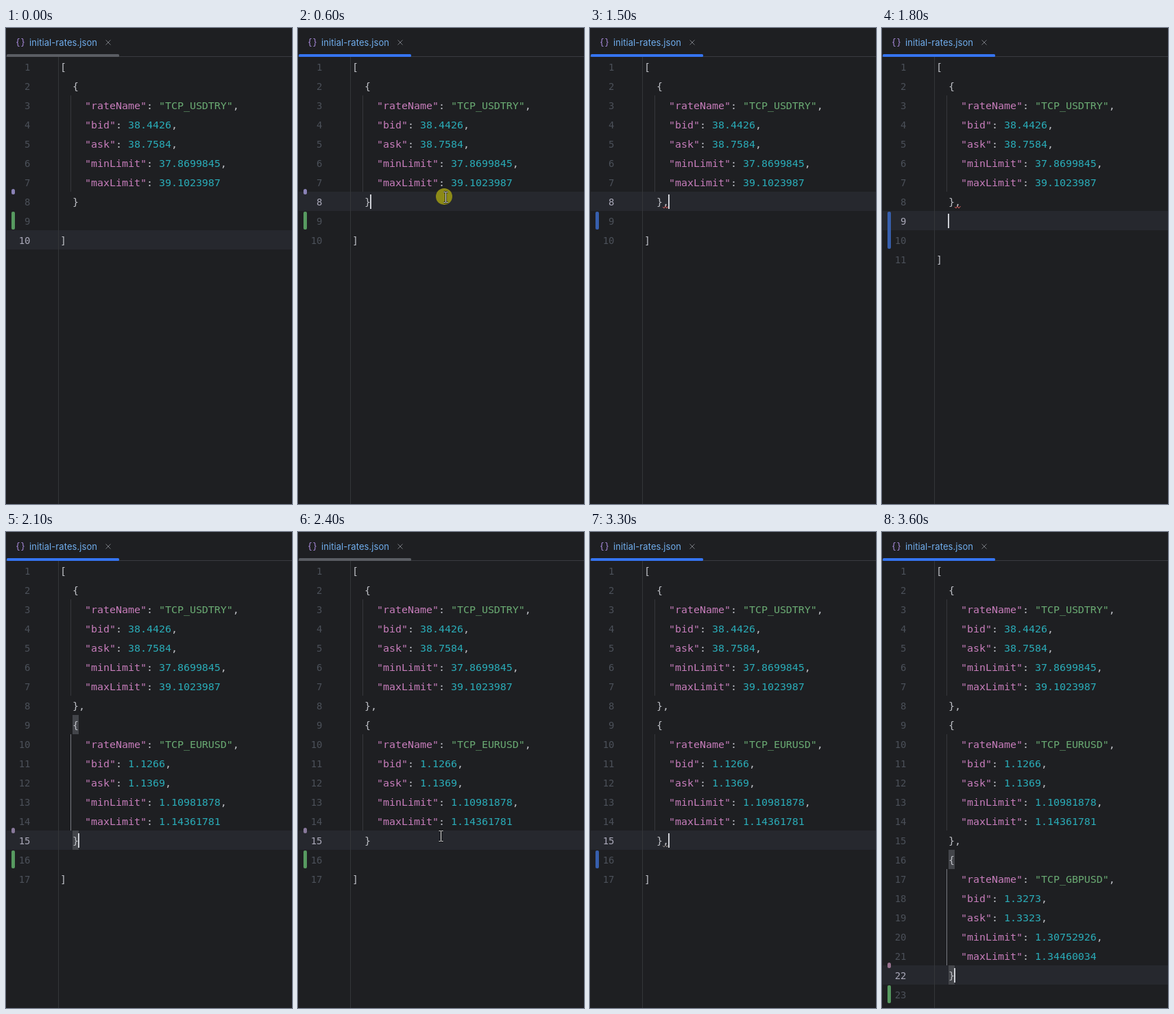
Animation, 417 px wide and 692 px high, one loop 4.2 s. Source, as an HTML page:

```html
<!DOCTYPE html>
<html lang="en">
<head>
<meta charset="utf-8">
<title>Editing rates</title>
<style>
  html, body { margin: 0; width: 100%; height: 100%; overflow: hidden; background: #1e1f22; }
  svg { display: block; }
  text { white-space: pre; }
  .code { font: 14.95px "DejaVu Sans Mono", "Noto Sans Mono", monospace; fill: #bcbec4; }
  .num { font: 13.95px "DejaVu Sans Mono", "Noto Sans Mono", monospace; fill: #4b5059; text-anchor: end; }
  .num.current { fill: #a9a8b8; }
  .tab { font: 13px Inter, "Open Sans", sans-serif; letter-spacing: .07px; fill: #70aeee; }
  .key { fill: #c77dbb; }
  .string { fill: #6aab73; }
  .number { fill: #2aacb8; }
</style>
</head>
<body>
<svg id="stage" width="417" height="692" viewBox="0 0 417 692"></svg>
<script>
const STEP = 300, LOOP = 4200;
const ROW = 28, TOP = 42, CHAR = 9, LEFT = 79;
const GREEN = '#579a60', BLUE = '#375fad', RED = '#d6605f';

const rowTop = n => TOP + (n - 1) * ROW;
const colX = c => LEFT + c * CHAR;

const rate = (name, bid, ask, min, max) => [
  '  {',
  `    "rateName": "TCP_${name}",`,
  `    "bid": ${bid},`,
  `    "ask": ${ask},`,
  `    "minLimit": ${min},`,
  `    "maxLimit": ${max}`,
  '  }'
];
const rates = [
  rate('USDTRY', '38.4426', '38.7584', '37.8699845', '39.1023987'),
  rate('EURUSD', '1.1266', '1.1369', '1.10981878', '1.14361781'),
  rate('GBPUSD', '1.3273', '1.3323', '1.30752926', '1.34460034')
];

// Joins the first rates, optionally with a trailing comma, and closes the array.
function doc(count, comma = '', tail = ['']) {
  const body = rates.slice(0, count).map(r => r.join('\n')).join(',\n') + comma;
  return ['[', ...body.split('\n'), ...tail, ']'];
}

const bar = (line, fill = GREEN, rows = 1) => ({ line, fill, rows });
const one = { lines: doc(1), row: 8, col: 3, bars: [bar(9)], dot: '#8a82b6', focus: true };
const oneComma = { ...one, lines: doc(1, ','), col: 4, dot: null };
const two = { lines: doc(2), row: 15, col: 3, bars: [bar(16)], dot: '#88799b', match: 9, focus: true };
const firstMouse = { mouse: [215.5, 246] };
const secondMouse = { mouse: [208.5, 442] };

const states = [
  { ...one, row: 10, focus: false },
  { ...one, row: 10, focus: false, ...firstMouse },
  { ...one, ...firstMouse, click: true },
  { ...one, ...firstMouse, match: 2 },
  { ...oneComma, match: 2, joined: true },
  { ...oneComma, bars: [bar(9, BLUE)], squiggle: RED },
  { ...oneComma, lines: doc(1, ',', ['', '']), row: 9, col: 2,
    bars: [bar(9, BLUE, 2)], squiggle: RED },
  two,
  { ...two, ...secondMouse, match: 0, focus: false },
  { ...two, ...secondMouse, click: true },
  { ...two, ...secondMouse },
  { ...two, lines: doc(2, ','), col: 4, match: 0, dot: null,
    bars: [bar(16, BLUE)], squiggle: '#8b8583' },
  { ...two, lines: doc(3), row: 22, bars: [bar(23)], dot: '#98728f', match: 16 }
];

const rect = (x, y, w, h, fill, r = 0) =>
  `<rect x="${x}" y="${y}" width="${w}" height="${h}" rx="${r}" fill="${fill}"/>`;
const path = (d, stroke, width = 1) =>
  `<path d="${d}" fill="none" stroke="${stroke}" stroke-width="${width}"/>`;

function paint(line) {
  return line.replace(/("\w+")(:?)|(\d[\d.]*)/g, (all, quoted, colon, number) => {
    const kind = number ? 'number' : colon ? 'key' : 'string';
    return `<tspan class="${kind}">${number || quoted}</tspan>${colon || ''}`;
  });
}

function tabBar(focus) {
  return rect(0, 41, 417, 1, '#393b40') +
    rect(1, 38, 164, 4, focus ? '#3574f0' : '#5a5d63', 1.5) +
    path('M19.5 15.5h-.8q-1.5 0-1.5 1.5v2.3q0 1.7-1.7 1.7q1.7 0 1.7 1.7v2.3q0 1.5 1.5 1.5h.8' +
      'M22.5 15.5h.8q1.5 0 1.5 1.5v2.3q0 1.7 1.7 1.7q-1.7 0-1.7 1.7v2.3q0 1.5-1.5 1.5h-.8', '#a98bdc', 1.1) +
    '<text class="tab" x="34" y="26">initial-rates.json</text>' +
    path('M145.5 17.5l7 7m0-7l-7 7', '#777a80');
}

function guides(s) {
  return s.lines.map((line, i) => line !== '  {' ? '' :
    rect(94, rowTop(i + 2), 1, 5 * ROW, s.match === i + 1 ? '#777a80' : '#36383c')).join('');
}

function gutterMarks(s) {
  let out = s.bars.map(b =>
    rect(8, rowTop(b.line) + 1, 5, b.rows * ROW - 2, b.fill, 2)).join('');
  if (s.joined) {
    const y = rowTop(s.row);
    out += rect(8, y + 1, 5, 10, BLUE, 2) + rect(8, y + 4, 5, ROW - 4, BLUE) +
      rect(8, y + ROW, 5, 4, GREEN);
  }
  if (s.dot) {
    const y = rowTop(s.lines.length - 2);
    out += rect(8, y - 4, 5, 8, s.dot, 2.5);
  }
  return out;
}

function textRows(s) {
  return s.lines.map((line, i) => {
    const n = i + 1, y = rowTop(n) + 20;
    return `<text class="num${n === s.row ? ' current' : ''}" x="35.5" y="${y}">${n}</text>` +
      `<text class="code" x="${LEFT}" y="${y}">${paint(line)}</text>`;
  }).join('');
}

function squiggle(s) {
  if (!s.squiggle) return '';
  const y = rowTop(s.lines.lastIndexOf('  },') + 1) + 24;
  return path(`M106 ${y - 2}l2 2l2-3l2 3l2.5-3`, s.squiggle);
}

function pointer([x, y], click) {
  const beam = `M${x - 3} ${y - 7.5}h2q1 0 1 1v13q0 1-1 1h-2` +
    `M${x + 3} ${y - 7.5}h-2q-1 0-1 1v13q0 1 1 1h2`;
  const halo = click ? `<circle cx="${x - 2.5}" cy="${y - 1}" r="12" fill="#8c8a18"/>` : '';
  return halo + path(beam, '#151618', 2.4) + path(beam, '#e4e4e4', 1);
}

function draw(s) {
  const y = rowTop(s.row);
  let out = rect(0, 0, 417, 692, '#1e1f22') + rect(1, y, 416, ROW, '#26282e') +
    rect(76, TOP, 1, 650, '#34363a') + guides(s);
  if (s.match) {
    out += [s.match, s.match + 6].map(n =>
      rect(colX(2), rowTop(n), CHAR, ROW, '#43454a')).join('');
  }
  out += tabBar(s.focus) + gutterMarks(s) + textRows(s) + squiggle(s);
  if (s.focus) out += rect(colX(s.col) - 1, y + 4, 2, 21, '#ced0d6');
  if (s.mouse) out += pointer(s.mouse, s.click);
  return out;
}

const stage = document.getElementById('stage');
let shown = -1;

function update(time) {
  const index = Math.min(Math.floor(time % LOOP / STEP), states.length - 1);
  if (index !== shown) {
    stage.innerHTML = draw(states[index]);
    shown = index;
  }
}

const start = performance.now();
function tick() {
  update(performance.now() - start);
  requestAnimationFrame(tick);
}
tick();
</script>
</body>
</html>
```
